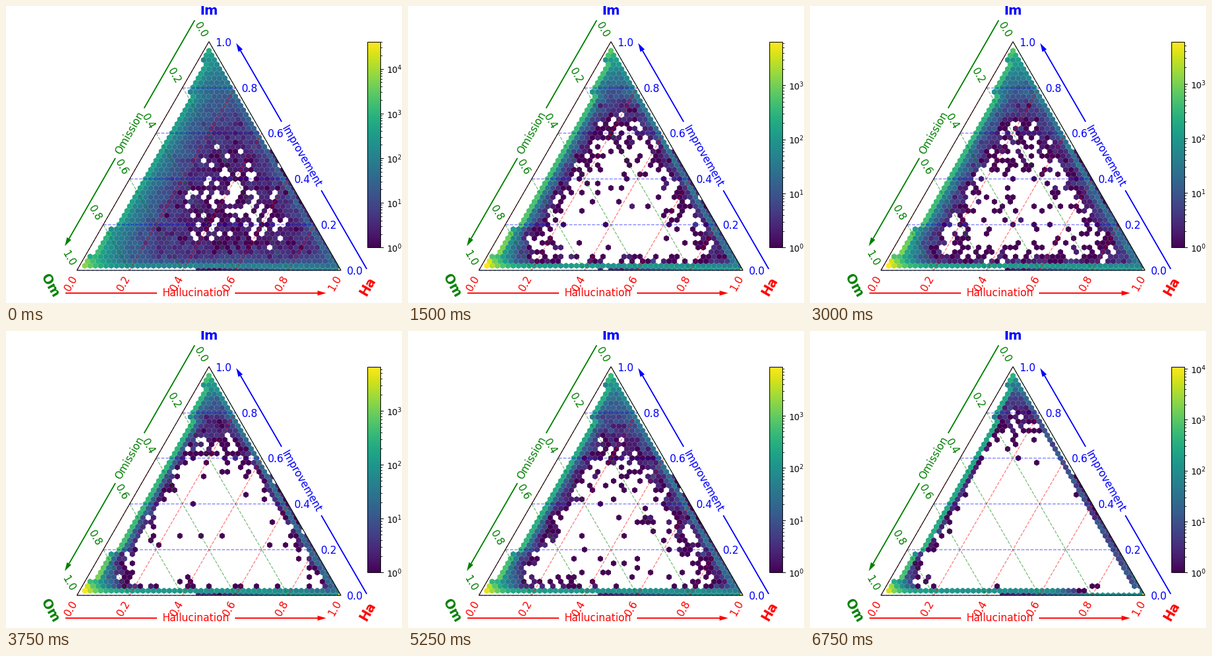
A matplotlib script that plays this animation: 640x480 px, repeating every 7.5 s.

```python
import numpy as np
import matplotlib.pyplot as plt
from matplotlib.animation import FuncAnimation
from matplotlib.cm import ScalarMappable
from matplotlib.collections import PolyCollection
from matplotlib.colors import LogNorm
from matplotlib.patches import Polygon

W, H, N, STEPS = 640, 480, 50, 10
HEIGHT = 369.6
SIDE = HEIGHT * 2 / np.sqrt(3)
LEFT, BASE = 328 - SIDE / 2, 427.2
CELL = SIDE / N
PAD = 9.72


def point(im, ha):
    return LEFT + SIDE * (ha + im / 2), BASE - HEIGHT * im


# lattice indices: k up from the base, i from the left edge, j from the right
k, i = np.mgrid[0:N + 1, 0:N + 1]
j = N - k - i
first = 1 + ((k > 3) & (k < 46)) + ((k > 9) & (k < 39))
inside = (k >= 1) & (k <= 48) & (i >= first) & (j >= 1)
base_row = (k == 0) & (i >= 23) & (j >= 0)
right_row = (k >= 1) & (k <= 26) & (j == 0)
above, below = np.roll(first, -1, axis=0), np.roll(first, 1, axis=0)
step_end = (i == first) & ((above > first) | (below > first))

cx, cy = point(k / N, i / N)
angle = np.radians(np.arange(30, 390, 60))
corner = CELL / np.sqrt(3) * np.column_stack([np.cos(angle), np.sin(angle)])


def setting(n):
    """Three rounds of three, each thinning out, after one dense opening."""
    return divmod(n - 1, 3) if n else (0, -0.3)


def peak(n):
    a, b = setting(n)
    return 3.76 + 0.013 * a ** 3.8 + 0.05 * b if n else 4.61


def decay(level, rate, depth, power=0.6):
    return level - rate * np.maximum(depth, 0) ** power


def counts(n):
    a, b = setting(n)
    rng = np.random.default_rng(40 + n)

    # log10 of the mean count contributed by each edge and corner
    left = decay(2.55 - 0.1 * a + 0.9 * np.exp(-k / 8),
                 0.7 + 0.25 * a + 0.42 * b, i - first)
    right = decay(1.35 - 0.1 * a * b + 0.5 * np.exp((k - 48) / 8),
                  0.58 + 0.08 * a + (0.28 + 0.18 * a) * b, j - 1)
    base = decay(0.85 - 0.5 * a - 0.75 * b + 0.6 * np.exp(-i / 8),
                 0.4 + 0.1 * a + 0.15 * b, k - 2)
    reach = 17.5 - a - (1 + a) * b
    apex = (2.4 - 0.15 * a) * (1 - ((48 - k) / reach).clip(0) ** 0.8)
    om = min(peak(n), 3.8) - 0.04 - (0.36 + 0.04 * a + 0.06 * b) * (i + k - 2)
    floor = -0.8 - 0.35 * a - (0.8 + 0.25 * a) * b
    mean = sum(10.0 ** v for v in (left, right, base, apex, om, floor))

    # the outermost rows follow their own profiles
    fade = 0.001 * 2.5 ** (a * b)
    line = decay(2.0 + 0.7 * np.exp(-i / 7), fade, i - 30, 2)
    mean = np.where(k == 1, 10.0 ** line + 10.0 ** om, mean)
    mean = np.where(step_end, mean / 4, mean) * inside
    under = np.minimum(0.3 + 0.11 * (i - 24), 2.1)
    beside = 0.35 + 0.07 * np.maximum(16 - k, 0)
    mean += base_row * 10.0 ** under + right_row * 10.0 ** beside

    c = rng.poisson(mean)
    c[0, N] = 10 ** peak(n)
    return c


fig = plt.figure(figsize=(W / 100, H / 100), dpi=100)
ax = fig.add_axes([0, 0, 1, 1])
ax.set(xlim=(0, W), ylim=(H, 0))
ax.axis("off")

norm = LogNorm(1, 10 ** peak(0))
hexes = PolyCollection([], cmap="viridis", norm=norm, edgecolors="none", zorder=1)
ax.add_collection(hexes, autolim=False)
triangle = Polygon([point(0, 0), point(0, 1), point(1, 0)], fill=False,
                   ec="black", lw=0.8, zorder=3)
ax.add_patch(triangle)
hexes.set_clip_path(triangle)


def label(x, y, s, color, rotation=0, **kw):
    style = dict(ha="center", va="center", fontsize=12)
    ax.text(x, y, s, color=color, rotation=rotation, **{**style, **kw})


def tick(p, v, color, rotation, ha, heading):
    t = np.radians(heading)
    label(p[0] + PAD * np.cos(t), p[1] - PAD * np.sin(t), f"{v:.1f}", color,
          rotation, ha=ha, va="center_baseline", rotation_mode="anchor")


def grid_line(p, q, color):
    ax.plot(*zip(p, q), color=color, ls="--", lw=1, alpha=0.5, zorder=2)


for v in np.arange(6) / 5:
    if v < 1:
        grid_line(point(v, 0), point(v, 1 - v), "blue")
        grid_line(point(0, v), point(1 - v, v), "red")
        grid_line(point(1 - v, 0), point(0, 1 - v), "green")
    tick(point(v, 1 - v), v, "blue", 0, "left", 0)
    tick(point(0, v), v, "red", 60, "right", 240)
    tick(point(1 - v, 0), v, "green", -60, "right", 120)


def arrow(start, end, gap, text, color, rotation):
    a, b = np.array(start, float), np.array(end, float)
    mid, u = (a + b) / 2, (b - a) / np.hypot(*(b - a))
    side = np.array([-u[1], u[0]]) * 4
    neck = b - 14 * u
    for p, q in ((a, mid - gap * u), (mid + gap * u, neck)):
        ax.plot(*zip(p, q), color=color, lw=1.4, solid_capstyle="butt")
    ax.add_patch(Polygon([b, neck + side, neck - side], fc=color, ec="none"))
    label(*mid, text, color, rotation)


arrow((305, 23), (95, 388), 46.5, "Omission", "green", 60)
arrow((583, 425), (372, 60), 64, "Improvement", "blue", -60)
arrow((96, 464), (517.5, 464), 63, "Hallucination", "red", 0)

big = dict(fontsize=15, fontweight="bold")
label(328, 8, "Im", "blue", **big)
label(71.5, 452, "Om", "green", -60, **big)
label(585, 453.5, "Ha", "red", 60, **big)

cax = fig.add_axes([(LEFT + 1.1 * SIDE) / W, 1 - (BASE - 0.1 * HEIGHT) / H,
                    0.05 * SIDE / W, 0.9 * HEIGHT / H])
fig.colorbar(ScalarMappable(norm, "viridis"), cax=cax)


def draw(n):
    c = counts(n)
    on = c > 0
    centers = np.column_stack([cx[on], cy[on]])
    norm.vmax = 10 ** peak(n)
    hexes.set_verts(centers[:, None, :] + corner)
    hexes.set_array(c[on])
    return [hexes]


anim = FuncAnimation(fig, draw, frames=STEPS, interval=750,
                     repeat=True, repeat_delay=0, blit=False)
plt.show()
```
